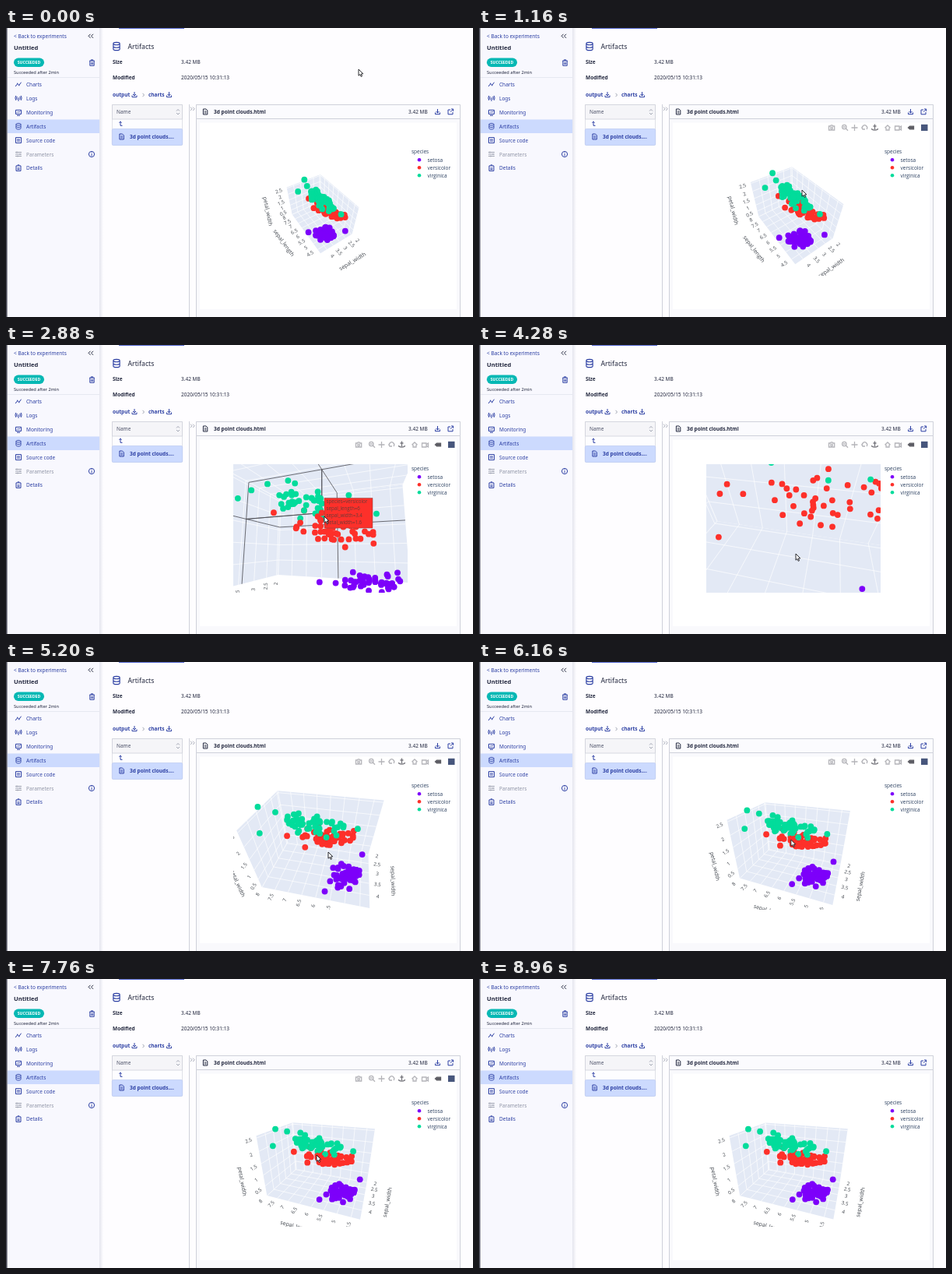
Recreate the animation shown at these times as an HTML page with a canvas. Size 600 by 371 pixels, loop 9000 ms.

```html
<!DOCTYPE html>
<html>
<head>
<meta charset="utf-8">
<style>
html, body { margin: 0; width: 100%; height: 100%; overflow: hidden; background: #fefdff; }
svg, canvas { position: absolute; left: 0; top: 0; width: 600px; height: 371px; }
svg { font: 6.5px "Noto Sans", "Open Sans", sans-serif; fill: #23283f; }
.b { font-weight: 600; }
.nav { fill: #2c3fa3; }
.i { fill: none; stroke: #2c3fa3; stroke-width: 1; }
.dark { stroke: #23283f; }
.gray { stroke: #a0a4b2; }
.plot { font: 6.5px "Open Sans", sans-serif; fill: #2a3f5f; }
#bar { fill: none; stroke: #b4b4b9; stroke-width: 1.3; }
</style>
</head>
<body>
<svg id="ui" viewBox="0 0 600 371">
  <defs>
    <path id="down" d="M0-3.5V1.5M-2-.5 0 1.6 2-.5M-3 1V3.2H3V1"/>
    <path id="file" d="M-2.6-3.5H1L2.8-1.7V3.5H-2.6ZM-1.2-.5H1.4M-1.2 1.5H1.4"/>
    <path id="db" d="M-3.6-3C-3.6-5 3.6-5 3.6-3S-3.6-1-3.6-3V3C-3.6 5 3.6 5 3.6 3V-3M-3.6 0C-3.6 2 3.6 2 3.6 0"/>
    <path id="back" d="M0-2.5-2.5 0 0 2.5M3.5-2.5 1 0 3.5 2.5"/>
    <linearGradient id="edge"><stop stop-color="#e4e5ee"/><stop offset="1" stop-color="#fefdff"/></linearGradient>
  </defs>

  <!-- sidebar -->
  <path d="M0 0H120V371H0Z" fill="#f8f8fe"/>
  <path d="M120 0H125V371H120Z" fill="url(#edge)"/>
  <path d="M0 0H1.6V371H0Z" fill="#4a4b57"/>
  <path d="M145 0H229V1H145Z" fill="#5366cf"/>
  <path d="M2 63.5H120" stroke="#dfe1ec" stroke-width=".7"/>
  <path d="M2 117.5H120V135H2Z" fill="#ccdafe"/>
  <text x="10" y="13" class="nav">&lt; Back to experiments</text>
  <use href="#back" x="108.5" y="10.3" class="i dark"/>
  <text x="10" y="28.3" font-size="7.6" font-weight="700">Untitled</text>
  <rect x="10" y="38.5" width="39" height="11.5" rx="5.7" fill="#06b8b4"/>
  <text x="29.5" y="46.3" font-size="5.2" font-weight="600" fill="#fff" text-anchor="middle">SUCCEEDED</text>
  <path d="M107 42.2H114M109.3 42V40.8H111.7V42M107.8 42.5V48.3H113.2V42.5M109.7 44V47M111.4 44V47" class="i"/>
  <text x="10" y="59" font-size="5.7">Succeeded after 2min</text>
  <circle class="i" cx="110" cy="162" r="3.6"/><path class="i" d="M110 161.5V164.2M110 159.6V160.5"/>

  <!-- details -->
  <use href="#db" transform="translate(142 23.5) scale(1.15)" class="i"/>
  <text x="156.5" y="27" font-size="8.7">Artifacts</text>
  <text x="137" y="46" class="b">Size</text><text x="225" y="46">3.42 MB</text>
  <text x="137" y="66" class="b">Modified</text><text x="225" y="66">2020/05/15 10:31:13</text>
  <g class="b nav"><text x="137" y="88">output</text><text x="183" y="88">charts</text></g>
  <use href="#down" x="165" y="85.5" class="i"/><use href="#down" x="209.5" y="85.5" class="i"/>
  <path d="M175.5 83.8 177.5 86 175.5 88.2" class="i gray"/>

  <!-- file list -->
  <path d="M136.5 98.5H226.5V150H136.5Z" fill="#fdfdff" stroke="#d9dae2" stroke-width=".8"/>
  <path d="M136.5 98.5H226.5V117H136.5Z" fill="#f5f5f8" stroke="#cfd1da" stroke-width=".8"/>
  <text x="142" y="110" fill="#4c5167">Name</text>
  <path d="M219 106.5 221 104.5 223 106.5M219 109 221 111 223 109" class="i gray"/>
  <path d="M145.5 121.7 147 120 148.5 121.7M147 120V125.3H149.5" class="i"/>
  <rect x="136.3" y="129.5" width="90.4" height="21" rx="1.5" fill="#ccdafe" stroke="#bccbf2" stroke-width=".7"/>
  <use href="#file" x="148.5" y="139.5" class="i"/>
  <text x="159" y="142" class="b nav">3d point clouds....</text>

  <!-- preview -->
  <path d="M235.5 98V371M244.5 98V371" stroke="#cfd1da"/>
  <use href="#back" transform="translate(240 103.8) scale(-.9 .9)" class="i gray"/>
  <path d="M244.5 98.5H583.5V372H244.5Z" fill="#f9f9fc" stroke="#cfd1da"/>
  <path d="M244.5 98.5H583.5V116.5H244.5Z" fill="#fbfbfe" stroke="#cfd1da"/>
  <path d="M249 121.5H579V361H249Z" fill="#fff"/>
  <use href="#file" x="256" y="107.5" class="i dark"/>
  <text x="267" y="110" class="b">3d point clouds.html</text>
  <text x="517" y="110">3.42 MB</text>
  <use href="#down" x="554.5" y="107.5" class="i"/>
  <path class="i" d="M571 105H568V110.8H574V108M571 107.8 574.5 104.2M572 104H574.6V106.8"/>
  <text x="521" y="161.3" class="plot">species</text>

  <!-- chart tools -->
  <g id="bar">
    <path d="M449.5 126H451.5L452.2 124.8H454L454.8 126H456.7V131H449.5Z"/><circle cx="453.1" cy="128.4" r="1.3"/>
    <circle cx="469.3" cy="127" r="2.7"/><path d="M471.3 129 474 131.8M468 127H470.6"/>
    <path d="M478.5 128H486.5M482.5 124V132"/>
    <path d="M493 130A3.2 3.2 0 1 1 498 130M491.5 127.5 493 130 496 130"/>
    <path d="M508.5 123.5V130M506.5 126H510.5M504.5 129Q504.5 131 508.5 131T512.5 129" stroke="#77777e"/>
    <path d="M521.5 128.3 525 125 528.5 128.3M523 128V131H527V128"/>
    <path d="M534.5 126H540V131H534.5ZM540 128 542.5 126V131L540 129"/>
    <path d="M551.5 128 553.5 126.2H558.5V129.8H553.5Z" fill="#5c5c63" stroke="#5c5c63"/>
    <path d="M568 123.8H576.5V132H568Z" fill="#47567c" stroke="none"/>
  </g>
</svg>
<canvas id="c"></canvas>
<script>
const LOOP = 9000, FOCAL = 199.2, CX = 404, CY = 235.5, NEAR = .04, UNIT = .3425;
const LO = [4.1875, 1.925, .025], HI = [8.0125, 4.475, 2.575];
const MID = LO.map((v, i) => (v + HI[i]) / 2);
const TITLES = ['sepal_length', 'sepal_width', 'petal_width'];
const TICKS = LO.map((lo, i) => {
  const list = [];
  for (let v = Math.ceil(lo * 2) / 2; v < HI[i]; v += .5) list.push(v);
  return list;
});
const HOVER = [6, 3.4, 1.6], HOVER_FROM = 2720, HOVER_TO = 3000, LEAVE = 8250;

// Each shot eases the camera and pointer from wherever they are to a new pose
const START = { az: 56.3, el: 47, zoom: -Math.log(3.45), x: 453, y: 53 };
const SHOTS = [
  { from: 250, to: 900, x: 415, y: 208 },
  { from: 900, to: 1750, az: 47, el: 42, zoom: -Math.log(1.33) },
  { from: 2100, to: 2720, az: 19, el: -8, zoom: -Math.log(1.18), x: 409, y: 220 },
  { from: 3000, to: 4200, az: 12, el: 42, zoom: -Math.log(.4), x: 407, y: 268 },
  { from: 4500, to: 5000, zoom: -Math.log(1.86), x: 414, y: 244 },
  { from: 5300, to: 6400, az: 22, el: 27.5, zoom: -Math.log(2.2), x: 399, y: 226 },
  { from: 7200, to: 7900, az: 20, el: 25 },
  { from: 7900, to: LEAVE, x: 480, y: 105 }
];

const SPECIES = [
  { name: 'setosa', color: '#7d00fa', mean: [5, 3.43, .24], dev: [.33, .34, .08], outer: [[4.5, 2.3, .3], [5.7, 4.4, .4]] },
  { name: 'versicolor', color: '#fd302a', mean: [5.94, 2.78, 1.33], dev: [.5, .29, .19], outer: [HOVER, [5, 2, 1]] },
  { name: 'virginica', color: '#02dc9b', mean: [6.55, 2.96, 2.03], dev: [.57, .29, .26], outer: [[7.9, 3.8, 2], [4.9, 2.5, 1.7]] }
];

let seed = 11;
const rand = () => (seed = (seed * 16807) % 2147483647) / 2147483647;
const bell = () => (rand() + rand() + rand() - 1.5) * 2;

// Measures of one flower share a common size factor and are rounded to .1
const points = SPECIES.flatMap(({ color, mean, dev, outer }) => {
  const flower = (_, n) => {
    const size = bell();
    return outer[n] || mean.map((m, i) => Math.round((m + dev[i] * (.75 * size + .66 * bell())) * 10) / 10);
  };
  return Array.from({ length: 50 }, flower).map(p => ({ p, color }));
});

const MENU = [
  ['Charts', 'M-3.8 2.5-1.3-1 .8 1 3.5-2.8M-1.3-1.8V-.5M.8.3V1.8'],
  ['Logs', 'M0-1V3.5M-1.8-2.5Q-2.8-.5-1.8 1.5M1.8-2.5Q2.8-.5 1.8 1.5M-3.2-3.5Q-5-.5-3.2 2.5M3.2-3.5Q5-.5 3.2 2.5'],
  ['Monitoring', 'M-3.5-3H3.5V2.2H-3.5ZM-2 4H2M-2 .5-.5-1 .7 0 2.2-1.6'],
  ['Artifacts', 'db'],
  ['Source code', 'M-3.5-3.5H3.5V3.5H-3.5ZM-2-1H2M-2 1H2'],
  ['Parameters', 'M-4-2.5H4M-4 0H4M-4 2.5H4M-2-3.5V-1.5M2-1V1M-1 1.5V3.5'],
  ['Details', 'M-3-3H3V3.5H-3ZM-1.2-4H1.2M-1.5 0H1.5M-1.5 1.7H1.5']
];
const ui = document.getElementById('ui');
const add = markup => ui.insertAdjacentHTML('beforeend', markup);
MENU.forEach(([name, icon], i) => {
  const y = 72.5 + i * 17.9, off = name === 'Parameters';
  add(`<g transform="translate(16 ${y})" class="i ${off ? 'gray' : ''}">${icon === 'db' ? '<use href="#db" transform="scale(.85)"/>' : `<path d="${icon}"/>`}</g>
    <text x="26" y="${y + 2.5}" class="${off ? '' : 'nav'}" ${off ? 'fill="#9095a6"' : ''}>${name}</text>`);
});
SPECIES.forEach(({ name, color }, i) => {
  const y = 169.3 + i * 10;
  add(`<circle cx="531" cy="${y}" r="2.3" fill="${color}"/><text x="541.5" y="${y + 2.4}" class="plot">${name}</text>`);
});

const canvas = document.getElementById('c'), ctx = canvas.getContext('2d');
const bar = document.getElementById('bar');
const ratio = window.devicePixelRatio || 1;
canvas.width = 600 * ratio;
canvas.height = 371 * ratio;

const clamp = v => Math.max(0, Math.min(1, v));
function poseAt(t) {
  const pose = { ...START };
  for (const { from, to, ...goal } of SHOTS) {
    const f = clamp((t - from) / (to - from)), e = f * f * (3 - 2 * f);
    for (const k in goal) pose[k] += (goal[k] - pose[k]) * e;
  }
  return pose;
}

let cam;
function setCamera({ az, el, zoom }) {
  const r = Math.PI / 180;
  cam = { c: Math.cos(az * r), s: Math.sin(az * r), ce: Math.cos(el * r), se: Math.sin(el * r), d: Math.exp(-zoom), below: el < 0 };
}
function view(p) {
  const [x, y, z] = p.map((v, i) => (v - MID[i]) * UNIT);
  const w = y * cam.c - x * cam.s;
  return [-x * cam.c - y * cam.s, z * cam.ce - w * cam.se, cam.d - w * cam.ce - z * cam.se];
}
const flat = ([u, v, z]) => [CX + FOCAL * u / z, CY - FOCAL * v / z];
const put = (p, i, v) => p.map((o, j) => j === i ? v : o);

// Path through space, cut at the near plane
function trace(list) {
  const pts = list.map(view), out = [];
  pts.forEach((b, i) => {
    const a = pts[(i || pts.length) - 1];
    if ((a[2] > NEAR) !== (b[2] > NEAR)) {
      const f = (NEAR - a[2]) / (b[2] - a[2]);
      out.push(a.map((v, j) => v + (b[j] - v) * f));
    }
    if (b[2] > NEAR) out.push(b);
  });
  ctx.beginPath();
  out.forEach(p => ctx.lineTo(...flat(p)));
}
function line(a, b) { trace([a, b]); ctx.stroke(); }

// Calls fn for each wall k with its two in-plane axes in both orders
function eachWallAxis(fn) {
  for (let k = 0; k < 3; k++) for (const i of [(k + 1) % 3, (k + 2) % 3]) fn(k, i, 3 - k - i);
}
function walls(far) {
  ctx.fillStyle = '#e3e9f5';
  for (let k = 0; k < 3; k++) {
    const i = (k + 1) % 3, j = (k + 2) % 3, a = put(LO, k, far[k]), b = put(HI, k, far[k]);
    trace([a, put(a, i, HI[i]), b, put(a, j, HI[j])]);
    ctx.fill();
  }
  ctx.strokeStyle = 'rgba(255,255,255,.85)';
  ctx.lineWidth = .8;
  eachWallAxis((k, i, j) => TICKS[i].forEach(v => {
    const a = put(far, i, v);
    line(put(a, j, LO[j]), put(a, j, HI[j]));
  }));
}
function spikes(far) {
  ctx.strokeStyle = '#4a4a50';
  ctx.lineWidth = .8;
  eachWallAxis((k, i) => {
    const p = put(HOVER, k, far[k]);
    line(HOVER, p);
    line(put(p, i, LO[i]), put(p, i, HI[i]));
  });
}

function label(text, x, y, dx, dy) {
  ctx.save();
  ctx.translate(x, y);
  ctx.rotate(Math.atan(dy / (dx || 1e-6)));
  ctx.fillText(text, 0, 0);
  ctx.restore();
}
function axis(k, edge, out, sign) {
  const mark = (value, gap, text, along) => {
    const p = put(edge, k, value), q = view(p);
    if (q[2] < .1) return;
    const [x, y] = flat(q), [ox, oy] = flat(view(put(p, out, p[out] + sign * .02)));
    const [ax, ay] = flat(view(put(p, k, value + .02)));
    const n = Math.hypot(ox - x, oy - y) || 1, dx = (ox - x) / n, dy = (oy - y) / n;
    label(text, x + dx * gap, y + dy * gap, along ? ax - x : dx, along ? ay - y : dy);
  };
  ctx.font = '6.3px "Open Sans", sans-serif';
  TICKS[k].forEach(v => mark(v, 11, String(v)));
  ctx.font = '7px "Open Sans", sans-serif';
  mark(MID[k], 31, TITLES[k], true);
}

function tooltip() {
  const x = 409, y = 196.5;
  ctx.fillStyle = SPECIES[1].color;
  ctx.strokeStyle = '#7c4440';
  ctx.lineWidth = .5;
  ctx.beginPath();
  ctx.rect(x, y, 62, 38.5);
  ctx.fill();
  ctx.stroke();
  ctx.fillStyle = '#6b3a38';
  ctx.font = '6.2px "Open Sans", sans-serif';
  ctx.textAlign = 'left';
  ['species=versicolor', ...TITLES.map((s, i) => s + '=' + HOVER[i])]
    .forEach((s, i) => ctx.fillText(s, x + 2.5, y + 6 + i * 9));
}

const arrow = new Path2D('M0 0V8.2L1.9 6.5 3.2 9.4 4.5 8.8 3.3 6 5.8 5.8Z');
function pointer(x, y) {
  ctx.save();
  ctx.translate(x, y);
  ctx.fillStyle = '#fff';
  ctx.strokeStyle = '#15151a';
  ctx.lineWidth = .9;
  ctx.fill(arrow);
  ctx.stroke(arrow);
  ctx.restore();
}

function draw(now) {
  const t = now % LOOP, pose = poseAt(t);
  setCamera(pose);
  ctx.setTransform(ratio, 0, 0, ratio, 0, 0);
  ctx.clearRect(0, 0, 600, 371);
  ctx.save();
  ctx.beginPath();
  ctx.rect(292, 153, 224, 165);
  ctx.clip();

  const far = [HI[0], LO[1], cam.below ? HI[2] : LO[2]];
  const hover = t >= HOVER_FROM && t < HOVER_TO;
  walls(far);
  ctx.fillStyle = '#3b4048';
  ctx.textAlign = 'center';
  ctx.textBaseline = 'middle';
  if (cam.below) {
    axis(1, [HI[0], 0, LO[2]], 2, -1);
  } else {
    axis(0, [0, HI[1], LO[2]], 1, 1);
    axis(1, [LO[0], 0, LO[2]], 0, -1);
  }
  axis(2, [HI[0], HI[1], 0], 1, 1);
  if (hover) spikes(far);
  points.map(o => ({ q: view(o.p), color: o.color }))
    .filter(o => o.q[2] > NEAR)
    .sort((a, b) => b.q[2] - a.q[2])
    .forEach(({ q, color }) => {
      ctx.beginPath();
      ctx.arc(...flat(q), 3.9, 0, 7);
      ctx.fillStyle = color;
      ctx.fill();
    });
  ctx.restore();
  if (hover) tooltip();
  if (t < LEAVE) pointer(pose.x, pose.y);
  bar.style.opacity = clamp(Math.min(t - 550, LEAVE - t) / 200);
  requestAnimationFrame(draw);
}
requestAnimationFrame(draw);
</script>
</body>
</html>
```
